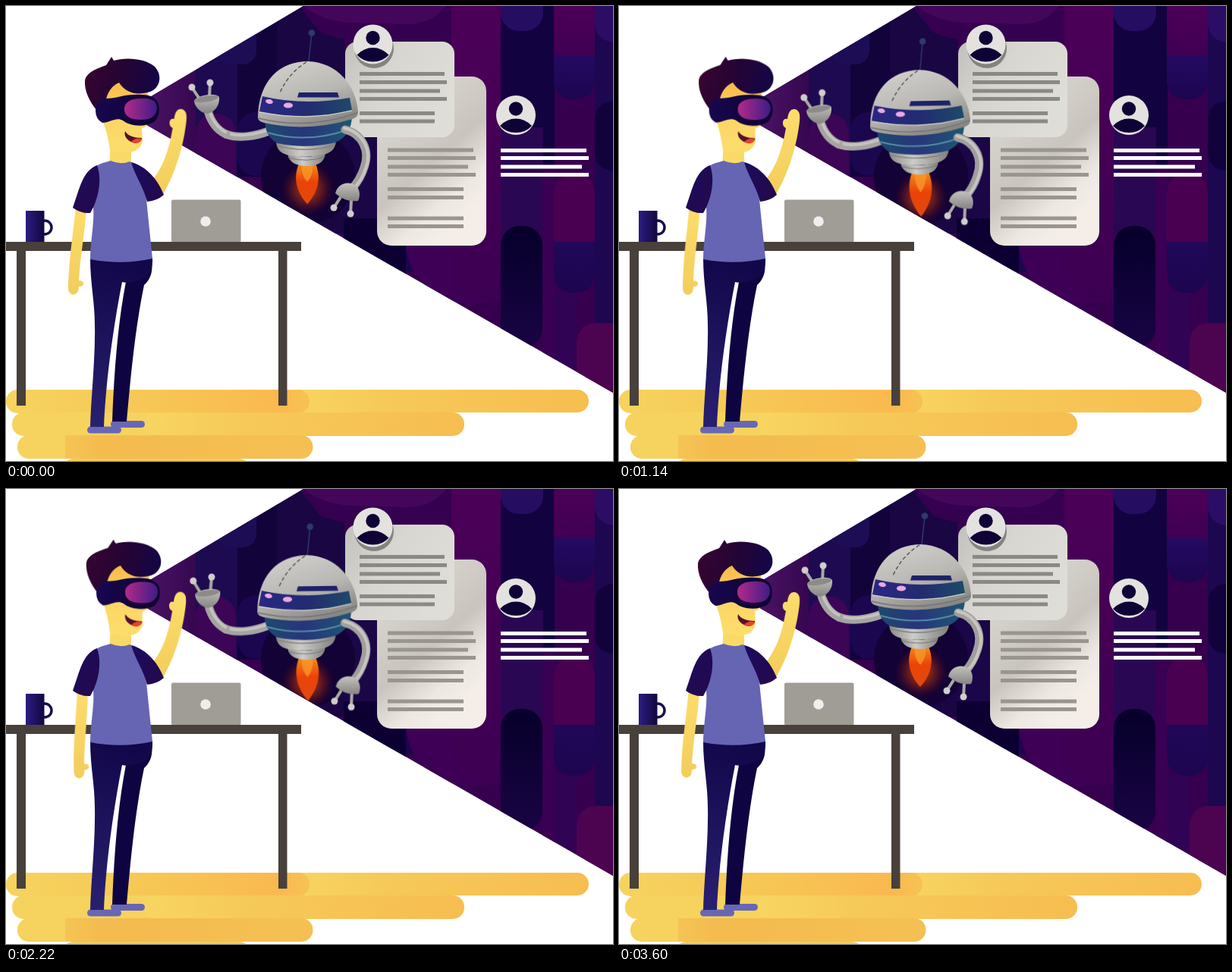
An HTML page for the animation above (3630 ms loop, 800x600 px).

```html
<!DOCTYPE html>
<html lang="en">
<head>
<meta charset="utf-8">
<title>Virtual assistant</title>
<style>
html, body { margin: 0; width: 100%; height: 100%; overflow: hidden; background: #fff; }
svg { display: block; width: 800px; height: 600px; }

.float, .sway, .flame, .grip, .wave, .arm, .head {
  animation: 1815ms cubic-bezier(.364, 0, .636, 1) infinite alternate;
}
.float { animation-name: float; animation-timing-function: cubic-bezier(.3, .05, .7, .95); }
.sway  { animation-name: sway; animation-duration: 907.5ms; animation-delay: -90ms; transform-origin: 397px 200px; }
.flame { animation-name: flame; animation-duration: 907.5ms; animation-delay: -90ms; transform-origin: 397px 208px; }
.grip  { animation-name: grip; animation-duration: 605ms; transform-origin: 290px 169px; }
.wave  { animation-name: wave; animation-duration: 605ms; animation-delay: -75ms; transform-origin: 200px 232px; }
.arm   { animation-name: arm; animation-delay: -3230ms; transform-origin: 108px 228px; }
.head  { animation-name: head; animation-delay: -3500ms; transform-origin: 153px 188px; }

@keyframes float { to { transform: translateY(16.8px); } }
@keyframes sway  { to { transform: rotate(-1.4deg); } }
@keyframes flame { to { transform: scaleY(1.14); } }
@keyframes grip  { to { transform: rotate(11.6deg); } }
@keyframes wave  { to { transform: rotate(-6.7deg); } }
@keyframes arm   { from { transform: rotate(.4deg); } to { transform: rotate(-3deg); } }
@keyframes head  { to { transform: rotate(1.3deg); } }
</style>
</head>
<body>
<svg viewBox="0 0 800 600">
  <defs>
    <clipPath id="beam"><path d="M156 140 392 0H800V510Z"/></clipPath>

    <linearGradient id="near"><stop stop-color="#561a70"/><stop offset="1" stop-color="#35074f"/></linearGradient>
    <linearGradient id="violet" x2="0" y2="1"><stop stop-color="#250a62"/><stop offset="1" stop-color="#1c0550"/></linearGradient>
    <linearGradient id="plum" x2="0" y2="1"><stop stop-color="#4c0058"/><stop offset="1" stop-color="#3c0052"/></linearGradient>
    <linearGradient id="dark" x2="0" y2="1"><stop stop-color="#06002a"/><stop offset="1" stop-color="#190444"/></linearGradient>

    <linearGradient id="cardBack" gradientUnits="userSpaceOnUse" x1="510" y1="140" x2="620" y2="267">
      <stop stop-color="#d8d4ce"/><stop offset=".5" stop-color="#c9c4be"/><stop offset=".8" stop-color="#eee8e2"/><stop offset="1" stop-color="#f5eee8"/>
    </linearGradient>
    <linearGradient id="cardFront" y2=".5"><stop stop-color="#c3c1bb"/><stop offset=".45" stop-color="#d8d6d0"/><stop offset="1" stop-color="#dfddd8"/></linearGradient>

    <linearGradient id="sand1"><stop stop-color="#f6d35f"/><stop offset=".4" stop-color="#f6c956"/><stop offset=".9" stop-color="#fab94f"/><stop offset="1" stop-color="#f6c254"/></linearGradient>
    <linearGradient id="sand2"><stop stop-color="#f8d562"/><stop offset=".3" stop-color="#f6ca58"/><stop offset="1" stop-color="#f7bd50"/></linearGradient>
    <linearGradient id="sand3"><stop stop-color="#f5c455"/><stop offset=".15" stop-color="#f4bb4f"/><stop offset="1" stop-color="#f5c053"/></linearGradient>

    <linearGradient id="mug"><stop stop-color="#2b1d82"/><stop offset="1" stop-color="#130640"/></linearGradient>
    <linearGradient id="skin" x2="0" y2="1"><stop stop-color="#fcdd6b"/><stop offset="1" stop-color="#f3cd5c"/></linearGradient>
    <linearGradient id="face" x2="0" y2="1"><stop stop-color="#f9b94a"/><stop offset=".5" stop-color="#fbd565"/><stop offset="1" stop-color="#fcde6c"/></linearGradient>
    <linearGradient id="hair" x2="1" y2=".25"><stop stop-color="#3a0530"/><stop offset=".5" stop-color="#260433"/><stop offset="1" stop-color="#150645"/></linearGradient>
    <linearGradient id="visor"><stop stop-color="#170750"/><stop offset="1" stop-color="#0f022f"/></linearGradient>
    <linearGradient id="lens"><stop stop-color="#b32a88"/><stop offset="1" stop-color="#3f1c86"/></linearGradient>
    <linearGradient id="sleeve" y2="1"><stop stop-color="#1a0c5c"/><stop offset="1" stop-color="#26084c"/></linearGradient>
    <linearGradient id="pants" gradientUnits="userSpaceOnUse" x1="170" y1="340" x2="115" y2="555"><stop stop-color="#120749"/><stop offset="1" stop-color="#282070"/></linearGradient>

    <linearGradient id="dome" x1=".3" y1="0" x2=".75" y2="1"><stop stop-color="#d0cec9"/><stop offset=".5" stop-color="#bab8b4"/><stop offset="1" stop-color="#82817f"/></linearGradient>
    <linearGradient id="steel"><stop stop-color="#8b8a88"/><stop offset=".4" stop-color="#cdccc8"/><stop offset="1" stop-color="#80807e"/></linearGradient>
    <linearGradient id="palm" x2="0" y2="1"><stop stop-color="#c3c2be"/><stop offset="1" stop-color="#858482"/></linearGradient>
    <linearGradient id="band"><stop stop-color="#2a2684"/><stop offset=".55" stop-color="#222c70"/><stop offset="1" stop-color="#1e4a6a"/></linearGradient>
    <linearGradient id="belly"><stop stop-color="#1d4a6c"/><stop offset=".45" stop-color="#28357c"/><stop offset="1" stop-color="#1e5672"/></linearGradient>
    <linearGradient id="fire" x2="0" y2="1"><stop stop-color="#f58a1c"/><stop offset=".45" stop-color="#ea4308"/><stop offset="1" stop-color="#df4a0c"/></linearGradient>
    <radialGradient id="glow"><stop stop-color="#e0500c" stop-opacity=".9"/><stop offset=".5" stop-color="#a02c10" stop-opacity=".55"/><stop offset="1" stop-color="#500a20" stop-opacity="0"/></radialGradient>

    <g id="avatar">
      <circle r="26" fill="#e4e2df"/>
      <g fill="#0f0336">
        <circle cy="-8.5" r="9.2"/>
        <path d="M-21 14Q-12 4.500 0 4.500T21 14Q13 23 0 23T-21 14Z"/>
      </g>
    </g>
  </defs>

  <!-- projected scene -->
  <g clip-path="url(#beam)">
    <path fill="#36004f" d="M150 0H800V520H150Z"/>
    <path fill="url(#near)" d="M150 0H251V260H150Z"/>
    <path fill="#1d0a50" d="M250 0H306V230H250Z"/>
    <rect x="250" y="142" width="53" height="130" rx="25" fill="#3c0556"/>
    <path fill="#12033b" d="M305 0H358V225H305Z"/>
    <rect x="278" y="20" width="52" height="57" rx="18" fill="#1d0d55"/>
    <rect x="305" y="140" width="52" height="84" rx="24" fill="#1b0650"/>
    <path fill="#190642" d="M357 0H446V300H357Z"/>
    <path fill="#34004f" d="M386 0H588V110C530 20 470 60 414 35Z"/>
    <path fill="#44065b" d="M392 0H580Q560 26 520 24C470 20 430 30 392 0Z"/>
    <path fill="#1b0648" d="M445 60Q500 20 540 70V350H445Z"/>
    <path fill="#0c0033" d="M445 280H527V360H445Z"/>
    <path fill="url(#violet)" d="M527 60H588V345H527Z"/>
    <ellipse cx="612" cy="310" rx="85" ry="82" fill="#3d0056"/>
    <path fill="url(#plum)" d="M587 0H652V390Q600 386 587 350Z"/>
    <path fill="#12023f" d="M652 0H723V210H652Z"/>
    <rect x="652" y="-30" width="56" height="63" rx="24" fill="#250d62"/>
    <path fill="#2a0752" d="M652 160H708V300H652Z"/>
    <rect x="652" y="290" width="55" height="160" rx="25" fill="url(#dark)"/>
    <path fill="#3a0053" d="M707 210H723V480H707Z"/>
    <path fill="url(#plum)" d="M722 0H776V80H722Z"/>
    <path fill="url(#violet)" d="M722 65H776V100Q774 123 749 123T722 100Z"/>
    <path fill="url(#violet)" d="M722 250H776V355Q774 378 749 378T722 355Z"/>
    <path fill="#4a0050" d="M722 311V247Q724 222 749 222T776 247V311Z"/>
    <path fill="#2a075a" d="M722 378H752V490H722Z" opacity=".45"/>
    <path fill="#1c0750" d="M776 0H800V420H776Z"/>
    <path fill="#2c0d65" d="M776 0H800V48Q779 45 776 25Z"/>
    <path fill="#11023c" d="M800 125Q778 128 776 148V195Q778 215 800 217Z"/>
    <rect x="752" y="418" width="70" height="110" rx="25" fill="#4c0450"/>
    <circle cx="398" cy="225" r="62" fill="#130235"/>
    <g class="float"><circle cx="398" cy="241" r="36" fill="url(#glow)"/></g>
  </g>

  <!-- message cards -->
  <rect x="489" y="93" width="144" height="223" rx="19" fill="url(#cardBack)"/>
  <rect x="447" y="47" width="144" height="126" rx="16" fill="url(#cardFront)"/>
  <g fill="none" stroke-width="5">
    <path stroke="#8b8985" d="M466 89.500H578M466 100.500H581M466 112H572M466 122.500H581M466 141.500H565M466 152H565"/>
    <path stroke="#99958f" d="M503 190H616M503 200.500H619M503 212H609M503 222.500H619M503 241.500H603M503 252.500H603M503 280H603M503 290.500H603"/>
    <path stroke="#fff" d="M652 190.500H765M652 200.500H768M652 212H759M652 222.500H768"/>
  </g>
  <circle cx="485" cy="56" r="26" fill="#85837f"/>
  <use href="#avatar" x="483.500" y="50.500"/>
  <use href="#avatar" x="672" y="144"/>

  <!-- robot -->
  <g class="float"><g class="sway">
    <g class="flame">
      <path fill="url(#fire)" d="M386 208C378 227 383 245 397 261C411 245 416 227 408 208Z"/>
      <path fill="#f99a2a" opacity=".75" d="M390 208Q388 222 397 232Q406 222 404 208Z"/>
    </g>

    <path fill="none" stroke="#a5a4a1" stroke-width="11" stroke-linecap="round" d="M346 165C328 172 306 175 290 169"/>
    <path fill="none" stroke="#c4c3bf" stroke-width="4" d="M346 163C328 170 306 173 290 167"/>
    <g class="grip">
      <path fill="none" stroke="#a5a4a1" stroke-width="11" stroke-linecap="round" d="M290 169C277 163 270 152 266 138"/>
      <path fill="none" stroke="#c4c3bf" stroke-width="4" d="M291 167C279 161 272 151 268 138"/>
      <path fill="none" stroke="#aaa9a6" stroke-width="4" d="M256 124 245 107M268 121 269 101"/>
      <path fill="url(#palm)" d="M248 125C250 118 276 113 281 120C282 130 276 140 265 142C255 140 249 133 248 125Z"/>
      <ellipse cx="264" cy="122.500" rx="16" ry="4" transform="rotate(-9 264 122)" fill="#8c8b88"/>
      <g fill="#cfcecb"><circle cx="245" cy="107" r="4.500"/><circle cx="269" cy="101" r="4.500"/></g>
    </g>

    <path fill="url(#steel)" d="M371 195Q397 203 421 194C420 205 412 211 397 211S373 206 371 195Z"/>
    <path fill="none" stroke="#777674" d="M372 200Q397 207 420 199"/>
    <path fill="url(#steel)" d="M356 179Q396 190 435 178C434 190 427 194 418 196Q397 201 373 197C362 194 357 190 356 179Z"/>
    <path fill="none" stroke="#858481" stroke-width="1.500" d="M357 184Q396 195 434 183"/>
    <path fill="url(#belly)" d="M341 147Q397 163 456 144C456 162 448 174 434 180Q397 189 358 181C346 175 341 164 341 147Z"/>
    <path fill="none" stroke="#558aa3" stroke-width="2" d="M345 167Q397 182 451 163"/>
    <path fill="url(#dome)" d="M332 147C333 99 360 73 398 73C437 74 462 106 464 139Q465 146 457 149Q397 167 340 154Q332 152 332 147Z"/>
    <path fill="none" stroke="#777674" stroke-width="1.500" d="M333 148Q397 164 463 141"/>
    <path fill="url(#band)" d="M338 119Q393 132 453 121L456 137Q397 152 334 139Z"/>
    <path fill="none" stroke="#d8d7d3" d="M334 140Q397 153 456 138"/>
    <path fill="#1d2268" d="M386 114H437L439 120.500H384Z"/>
    <g fill="#eba9e3"><ellipse cx="347" cy="126" rx="5" ry="3" transform="rotate(12 347 126)"/><ellipse cx="372" cy="131" rx="6.200" ry="3.500"/></g>
    <path fill="none" stroke="#4c4a4a" stroke-width="1.300" stroke-dasharray="5 3" d="M396 74Q374 87 361 114"/>
    <path stroke="#30376c" stroke-width="1.500" d="M399 73 403 36"/>
    <circle cx="403" cy="35.500" r="4.300" fill="#2d396f"/>

    <path fill="none" stroke="#a09f9c" stroke-width="11" stroke-linecap="round" d="M447 163C470 169 480 191 472 213C468 226 463 233 456 241"/>
    <path fill="none" stroke="#c6c5c1" stroke-width="4" stroke-linecap="round" d="M446 161C471 167 483 191 474 214C470 227 465 233 459 240"/>
    <path fill="none" stroke="#aaa9a6" stroke-width="4" d="M441 252 432 266M455 256 454 274"/>
    <path fill="url(#palm)" d="M434 247C437 235 449 230 460 236C467 241 467 251 464 257Q447 259 434 247Z"/>
    <g fill="#cfcecb"><circle cx="432" cy="266" r="4.500"/><circle cx="454" cy="274" r="4.500"/></g>
  </g></g>

  <!-- floor -->
  <rect x="370" y="506" width="398" height="30" rx="15" fill="url(#sand2)"/>
  <rect y="506" width="400" height="31" rx="15" fill="url(#sand1)"/>
  <rect x="8" y="536" width="300" height="31" rx="15" fill="#f6d35e"/>
  <rect x="182" y="536" width="422" height="31" rx="15" fill="url(#sand2)"/>
  <rect x="15" y="566" width="200" height="31" rx="15" fill="#f6d25e"/>
  <path fill="url(#sand3)" d="M78 566H389A15 15 0 0 1 389 597H78Z"/>
  <rect x="74" y="597" width="248" height="30" rx="15" fill="#f5cc5b"/>

  <!-- desk -->
  <rect x="218" y="255.500" width="91.500" height="56" rx="2" fill="#a09c96"/>
  <circle cx="263" cy="284" r="6.800" fill="#efeeec"/>
  <circle cx="51" cy="292" r="9" fill="none" stroke="#1a0c52" stroke-width="3.500"/>
  <path fill="url(#mug)" d="M26 270H50.500V311H26Z"/>
  <path fill="#48403b" d="M0 311H389V323H370.500V527H359V323H26V527H14V323H0Z"/>

  <!-- man -->
  <g fill="#6767b6">
    <rect x="138" y="547" width="45" height="9" rx="4.500"/>
    <rect x="107" y="554.500" width="45" height="9" rx="4.500"/>
  </g>
  <path fill="#0d0441" d="M150 336H192C194 351 190 361 182 368C171 420 164 490 159 548H140C142 490 147 420 158 364Z"/>
  <path fill="url(#pants)" d="M111 333H193C194 352 184 361 170 363Q160 366 153 364C141 425 131 500 129 555H111C112 515 118 465 117 420C117 390 111 365 111 333Z"/>

  <path class="arm" fill="url(#skin)" d="M92 262C89 300 83 330 82 372C82 383 94 383 95.500 374L96 370Q102 370 102 366T96 362C98 330 103 305 106 268Z"/>
  <path class="wave" fill="url(#skin)" d="M194 228C207 212 215 190 220 161Q215 158 216 153T222 149C223 140 226 136 231 136C238 137 239 143 238 152C235 179 226 216 206 250Z"/>

  <path fill="#fada67" d="M138 180H165V212H136Z"/>
  <path fill="#6565b4" d="M117 212C127 206 136 205 138 204Q151 210 163 205C173 209 181 224 184 245Q188 285 193 333Q153 342 111 334C112 300 119 275 113 255Z"/>
  <path fill="url(#sleeve)" d="M120 210C101 217 97 241 88 266Q99 274 111 273C122 255 127 229 120 210Z"/>
  <path fill="url(#sleeve)" d="M165 206C185 211 201 230 208 249Q199 257 186 258C181 238 171 226 165 206Z"/>

  <g class="head">
    <path fill="url(#face)" d="M127 140C132 115 140 103 149 100H187V155Q185 160 179 161L180 178C177 190 167 194 158 193Q147 193 137 190Q134 168 127 150Z"/>
    <path fill="#56102f" d="M157 165C160 171 169 174 179 174C179 179 173 182 167 180C159 177 155 171 157 165Z"/>
    <path fill="#e8432b" d="M165 179Q170 173 179 175C178 180 171 183 165 179Z"/>
    <path fill="url(#hair)" d="M120 138C110 126 103 112 104 98C107 86 122 82 132 78L139 67L142 72C158 67 184 69 196 80C207 92 203 108 190 113C175 118 158 116 149 101C139 105 134 114 131 126Z"/>
    <path fill="url(#visor)" d="M118 138C118 128 124 123 132 122C145 122 155 117 168 117C185 116 196 118 200 127C204 137 201 148 195 153C183 160 164 159 154 151C145 146 137 154 127 154Q118 149 118 138Z"/>
    <path fill="url(#lens)" d="M156 136C156 126 166 122 177 122C191 121 199 125 199 135C198 146 190 150 178 150C165 150 156 146 156 136Z"/>
  </g>
</svg>
</body>
</html>
```
